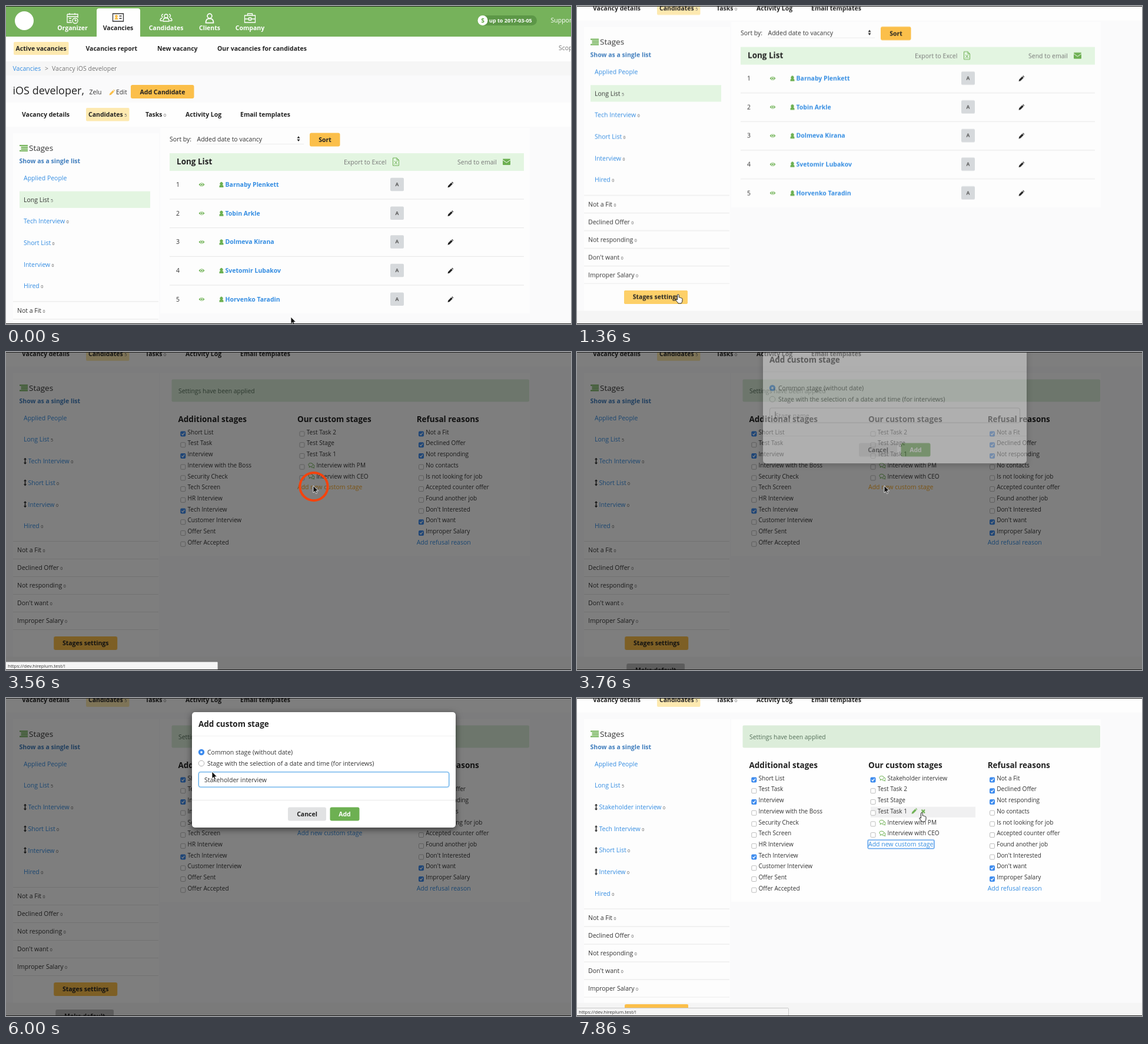
These frames come from a looping animation (960x540 px, 8000 ms). An HTML page:

```html
<!DOCTYPE html>
<html lang="en">
<head>
<meta charset="utf-8">
<title>Recruiting stages</title>
<style>
html, body { margin: 0; width: 100%; height: 100%; overflow: hidden; background: #fafafb; }
svg { display: block; width: 960px; height: 540px; }
text { font: 10.5px "Open Sans", "Noto Sans", sans-serif; fill: #333; white-space: pre; }
.b { font-weight: 700; fill: #222; }
.h { font-size: 13.5px; }
.big { font-size: 18px; fill: #222; }
.s { font-size: 10.05px; }
.m { text-anchor: middle; }
.l { fill: #348de2; }
.w { fill: #fff; }
.g { fill: #767676; }
.o { fill: #f5a623; }
.n { font-size: 7px; font-weight: 400; fill: #555; }

.scroll, .wide, .grow, .indent, .stretch, .dim, .dialog, .focus, .cursor { animation: 8s infinite; }
.scroll { animation-name: scroll; }
.wide { animation-name: wide; animation-timing-function: step-end; }
.grow { animation-name: grow; animation-timing-function: step-end; }
.indent { animation-name: indent; animation-timing-function: step-end; }
.stretch { animation-name: stretch; animation-timing-function: step-end; }
.dim { animation-name: dim; animation-timing-function: linear; }
.dialog { animation-name: dialog; animation-timing-function: ease-out; }
.focus { animation-name: focus; animation-timing-function: linear; }
.cursor { animation-name: cursor; animation-timing-function: ease-in-out; }
.ring { animation: ring 8s linear infinite; fill: none; stroke: #f4430d; stroke-width: 4; }

@keyframes scroll {
  0%, 6.1% { transform: none; animation-timing-function: ease-out; }
  9.125%, 100% { transform: translateY(-180.4px); }
}
@keyframes wide { 42.75%, 100% { transform: translateX(var(--dx)); } }
@keyframes grow { 93.5%, 100% { transform: translateY(var(--dy)); } }
@keyframes indent { 22.875%, 100% { transform: translateX(7.5px); } }
@keyframes stretch { 42.75%, 100% { x: 281.5px; width: 607.5px; } }
@keyframes dim {
  0%, 42.25% { opacity: 0; }
  44.25%, 92.5% { opacity: .5; }
  95%, 100% { opacity: 0; }
}
@keyframes dialog {
  0%, 46% { opacity: 0; transform: translateY(-50px); }
  50%, 92.5% { opacity: 1; transform: none; }
  94.5%, 100% { opacity: 0; transform: translateY(-50px); }
}
@keyframes focus {
  0%, 57.6% { opacity: 0; }
  59.6%, 80% { opacity: 1; }
  82%, 100% { opacity: 0; }
}
@keyframes ring {
  0% { r: 4.5px; opacity: 1; }
  3.25% { r: 27px; opacity: 1; }
  3.26%, 100% { r: 27px; opacity: 0; }
}
@keyframes cursor {
  0%, 11.25% { transform: translate(484px, 528px); }
  16.5%, 20.5% { transform: translate(172px, 490px); }
  30.75% { transform: translate(502px, 300px); }
  32.875%, 35.375% { transform: translate(501px, 270px); }
  40%, 47.5% { transform: translate(522px, 227px); }
  55.25%, 70.375% { transform: translate(489px, 136px); }
  75% { transform: translate(350px, 125px); }
  77.875%, 82% { transform: translate(331px, 110px); }
  87.875%, 93.75% { transform: translate(575px, 198px); }
  98%, 100% { transform: translate(586px, 195px); }
}
</style>
</head>
<body>
<svg id="stage" viewBox="0 0 960 540" xmlns="http://www.w3.org/2000/svg"></svg>
<script>
const LOOP = 8000, OPEN = 1830, ADDED = 7480;
const GREEN = '#6db052', AMBER = '#fbbf4a', MINT = '#e3f5e1', CREAM = '#fde9b0';

const text = (x, y, s, cls = '') => `<text x="${x}" y="${y}" class="${cls}">${s}</text>`;
const count = v => `<tspan dx="2.5" class="n">${v}</tspan>`;
const box = (x, y, w, h, fill, r = 0, more = '') =>
  `<rect x="${x}" y="${y}" width="${w}" height="${h}" rx="${r}" fill="${fill}" ${more}/>`;
const rule = (x1, x2, y, c = '#e6e6e6') => box(x1, y, x2 - x1, 1, c);
const path = (d, fill, more = '') => `<path d="${d}" fill="${fill}" ${more}/>`;
const at = (x, y, s) => `<g transform="translate(${x} ${y})">${s}</g>`;
// Shows its content only during the given spans of the loop, in ms.
const on = (spans, s) => `<g data-on="${spans}">${s}</g>`;
const wide = (dx, s) => `<g class="wide" style="--dx:${dx}px">${s}</g>`;
const grow = (dy, s) => `<g class="grow" style="--dy:${dy}px">${s}</g>`;
const each = (list, f) => list.map(f).join('');

const pencil = c => path('M-4.5 4.5L-3.7 1.4 1.5-3.8 3.8-1.5-1.4 3.7ZM2.2-4.5L3.2-5.2 5.2-3.2 4.5-2.2Z', c);
const person = path('M-3.5 4.5V2.5Q-3.5.5-1.5.2A2.6 2.6 0 1 1 1.5.2Q3.5.5 3.5 2.5V4.5Z', GREEN);
const eye = path('M-5 0Q0-6 5 0 0 6-5 0Z', GREEN) +
  '<circle r="2.4" fill="#fff"/><circle r="1.4" fill="' + GREEN + '"/>';
const chat = path('M-5-1a3.8 2.8 0 1 1 4 2.6L-4 3.2-3.2 1.2Q-5 .4-5-1ZM3.2-1.6Q5.2-.6 5 1 5 2 4 2.8L4.8 4.4 2.4 3.6Q.4 3.8-.6 2.8',
  'none', `stroke="${GREEN}" stroke-width="1"`);
const upDown = path('M0-5.5L2.6-2.6H.7V2.6H2.6L0 5.5-2.6 2.6H-.7V-2.6H-2.6Z', '#222');

const check = (x, y, ticked) => ticked
  ? box(x - 4.5, y - 4.5, 9, 9, '#3d8bee', 2) +
    path(`M${x - 2.3} ${y}l1.8 2 3-4.2`, 'none', 'stroke="#fff" stroke-width="1.3"')
  : box(x - 4, y - 4, 8, 8, '#fff', 1.5, 'stroke="#aaa" stroke-width=".8"');

const radio = (y, ticked) => ticked
  ? `<circle cx="332" cy="${y}" r="5.2" fill="#3d8bee"/><circle cx="332" cy="${y}" r="1.8" fill="#fff"/>`
  : `<circle cx="332" cy="${y}" r="4.8" fill="#fff" stroke="#aaa" stroke-width=".9"/>`;

function header() {
  const head = 'M-3 0a3 3 0 1 1 6 0a3 3 0 1 1-6 0';
  const bust = head + 'M-5 9Q-5 4-1.5 3.5H1.5Q5 4 5 9Z';
  const line = (d, c = '#fff') => path(d, 'none', `stroke="${c}" stroke-width="1.3"`);
  return box(0, 0, 960, 52, '#76b25b') + box(0, 52, 960, 42, '#fefefe') + box(0, 94, 960, 24, '#f6f6f6') +
    '<circle cx="31" cy="25" r="16" fill="#fff"/>' +
    path('M154 52V8q0-4 4-4h66q4 0 4 4v44z', '#fefefe') +
    at(113, 20, line('M-9-6H9V0M-9-6V8H-1M-9-2H9M-5-8V-5M4-8V-5M-6 1H-2M-6 5H-2M0 5a4.5 4.5 0 1 1 9 0a4.5 4.5 0 1 1-9 0M4.5 2V5H7')) +
    at(190.5, 19, line('M-9-6H9V7H-9ZM2-2H6M2 2H6', '#333') +
      path('M-6 4Q-6 1-3.5.8A2.4 2.4 0 1 1-2.5.8Q0 1 0 4Z', AMBER)) +
    at(272, 17, line(bust) + at(-7, 1, line('M2-4a2.5 2.5 0 1 0 0 5M-3 7Q-3 3 0 2.5M-3 7H1')) +
      at(7, 1, line('M-2-4a2.5 2.5 0 1 1 0 5M3 7Q3 3 0 2.5M3 7H-1'))) +
    at(346, 17, `<g transform="scale(1.3)">${line(bust)}</g>`) +
    at(414.5, 20, line('M-9-4H9V8H-9ZM-4-4V-7H4V-4M-9 2H-2M2 2H9M-2 0H2V4H-2Z')) +
    each([[113, 'Organizer'], [272, 'Candidates'], [346, 'Clients'], [414.5, 'Company']],
      ([x, s]) => text(x, 41, s, 'b m w')) +
    text(190.5, 41, 'Vacancies', 'b m') +
    box(804, 16, 98, 17, '#5c9747', 8.5) + '<circle cx="810" cy="24.5" r="8.5" fill="#fff"/>' +
    `<text x="810" y="28" class="b m" style="fill:${GREEN};font-size:10px">$</text>` +
    '<text x="821" y="27.7" class="b w" style="font-size:9px">up to 2017-03-05</text>' +
    text(925.5, 27.7, 'Support', 'w') + text(939, 75, 'Scope', 'g') +
    box(13, 61, 93.5, 22, CREAM, 2) +
    each([[16.5, 'Active vacancies'], [135.5, 'Vacancies report'], [257, 'New vacancy'],
      [359, 'Our vacancies for candidates']], ([x, s]) => text(x, 76, s, 'b')) +
    text(11.5, 110, 'Vacancies', 'l') + text(66, 110, '&gt;', 'g') + text(78, 110, 'Vacancy iOS developer', 'g') +
    text(11.5, 150, 'iOS developer,', 'big') + text(141.5, 150, 'Zelu') + at(180, 147, pencil(AMBER)) +
    text(187, 150, 'Edit') + box(212, 134, 107.5, 23, AMBER, 3) + text(266, 149.5, 'Add Candidate', 'b m') +
    box(0, 164, 960, 41, '#fefefe') + box(136, 173, 73.5, 22.5, CREAM, 2) +
    each([[27, 'Vacancy details'], [140, 'Candidates' + count(5)], [237, 'Tasks' + count(0)],
      [305, 'Activity Log'], [398, 'Email templates']], ([x, s]) => text(x, 187.7, s, 'b'));
}

function candidates() {
  const names = ['Barnaby Plenkett', 'Tobin Arkle', 'Dolmeva Kirana', 'Svetomir Lubakov', 'Horvenko Taradin'];
  return text(278, 230, 'Sort by:') + text(324.5, 230, 'Added date to vacancy') + rule(324, 506, 234, '#ececec') +
    path('M494.5 224.5L497 221 499.5 224.5ZM494.5 226.5L497 230 499.5 226.5Z', '#222') +
    box(516, 215.5, 51.5, 23, AMBER, 3) + text(542, 231, 'Sort', 'b m') +
    box(278, 250, 602, 30, MINT) + text(290, 269, 'Long List', 'b h') +
    text(574, 268.7, 'Export to Excel', 'g') + text(767, 268.7, 'Send to email', 'g') +
    path('M657.5 258H664L667.5 261.5V271H657.5ZM664 258V261.5H667.5M660 263L665 269M665 263L660 269', 'none',
      `stroke="${GREEN}"`) +
    box(844, 259.5, 13, 10.5, GREEN, 1) + path('M844 261.5L850.5 266 857 261.5', 'none', 'stroke="#fff"') +
    each(names, (name, i) => at(0, 303.3 + 48.67 * i,
      text(289, 3.7, i + 1) + at(332.5, 0, eye) + at(366, .3, person) + text(372.5, 3.7, name, 'b l') +
      box(653, -11.5, 23, 22.5, '#d6d9dc', 2) +
      '<text x="664.5" y="2.8" class="b m" style="font-size:8.5px;fill:#555">A</text>' +
      at(755, .5, pencil('#222')) + (i < 4 ? rule(278, 880, 24.2) : '')));
}

function sidebar() {
  const stage = (s, y) =>
    on(`${OPEN}-${LOOP}`, at(32.5, y - 3.8, upDown)) + `<g class="indent">${text(30, y, s + count(0), 'l')}</g>`;
  const lines = each([[23, 14], [25.5, 11.5], [25.5, 11.5], [23, 14]], ([x, w], i) => box(x, 55.5 + 3 * i, w, 2, GREEN));
  const refusals = ['Not a Fit', 'Declined Offer', 'Not responding', "Don't want", 'Improper Salary'];
  return lines + text(39, 65.5, 'Stages', 'h') + `<text x="22.5" y="86.5" class="b" style="fill:#3f7dbd">Show as a single list</text>` +
    text(30, 115.7, 'Applied People', 'l') +
    on(`0-${OPEN}`, box(23, 134, 222, 28.5, MINT) + text(30, 152.3, 'Long List' + count(5))) +
    on(`${OPEN}-${LOOP}`, text(30, 152.3, 'Long List' + count(5), 'l')) +
    on(`${ADDED}-${LOOP}`, stage('Stakeholder interview', 189)) +
    grow(36.6, stage('Tech Interview', 189) + stage('Short List', 225.7) + stage('Interview', 262.5) +
      text(30, 299, 'Hired' + count(0), 'l') + rule(12, 259, 321) +
      each(refusals, (s, i) => text(19, 340.3 + 30 * i, s + count(0)) + rule(12, 259, 351 + 30 * i)) +
      wide(1.2, box(80, 483, 108, 23, AMBER, 3) + on('1290-1900', box(80, 483, 108, 23, '#fdd069', 3)) +
        text(134, 498, 'Stages settings', 'b m') +
        on(`${OPEN}-${LOOP}`, box(83, 529, 99, 24, '#bababa', 3) + text(132.5, 543.7, 'Make default', 'b m'))));
}

function settings() {
  const extra = ['*Short List', 'Test Task', '*Interview', 'Interview with the Boss', 'Security Check', 'Tech Screen',
    'HR Interview', '*Tech Interview', 'Customer Interview', 'Offer Sent', 'Offer Accepted'];
  const custom = ['Test Task 2', 'Test Stage', 'Test Task 1', '@Interview with PM', '@Interview with CEO'];
  const refusal = ['*Not a Fit', '*Declined Offer', '*Not responding', 'No contacts', 'Is not looking for job',
    'Accepted counter offer', 'Found another job', "Don't Interested", "*Don't want", '*Improper Salary'];
  // A leading * marks a ticked box, @ an interview stage.
  const item = (x, s, i) => {
    const y = 139 + 18.72 * i, talk = s.includes('@');
    return check(x, y, s.includes('*')) + (talk ? at(x + 16, y - 2.5, chat) : '') +
      text(x + (talk ? 24.5 : 7.7), y + .7, s.replace(/[*@]/g, ''), 's');
  };
  const link = 'Add new custom stage';
  return box(262, 36, 628, 310, '#fefefe') + box(278, 46.5, 601, 38, '#dcedda', 2, 'class="stretch"') +
    wide(3, `<text x="290" y="69.5" style="font-size:10.35px;fill:#55705a">Settings have been applied</text>` +
      text(289.5, 119, 'Additional stages', 'b h') + each(extra, (s, i) => item(297.8, s, i))) +
    wide(5, text(490, 119, 'Our custom stages', 'b h') +
      on(`${ADDED}-${LOOP}`, item(498, '*@Stakeholder interview', 0)) +
      grow(18.72, on(`7700-${LOOP}`, box(494, 166, 178, 18, '#f0f0f1') + at(568, 173.5, pencil(GREEN)) +
          path('M580.5 171l5.5 5.5M586 171l-5.5 5.5', 'none', `stroke="${GREEN}" stroke-width="2.2"`)) +
        each(custom, (s, i) => item(498, s, i)) +
        on(`${ADDED}-${LOOP}`, box(489.3, 222.3, 112.5, 14.5, 'none', 1.5, 'stroke="#6aa9ee" stroke-width="1.8"')) +
        on(`0-3050 3800-${LOOP}`, text(490, 233.3, link, 'l')) + on('3050-3800', text(490, 233.3, link, 'o')))) +
    wide(7.2, text(690.5, 119, 'Refusal reasons', 'b h') + each(refusal, (s, i) => item(698.3, s, i)) +
      text(690.5, 327, 'Add refusal reason', 'l'));
}

function dialog() {
  return `<g class="dialog">` +
    box(316, 24, 448, 196, '#fff', 5, 'style="filter:drop-shadow(0 3px 6px rgba(0,0,0,.55))"') +
    text(327, 49, 'Add custom stage', 'b h') + rule(316, 764, 64, '#f1f1f1') + rule(316, 764, 173, '#e8e8e8') +
    on('0-6400', radio(92, true) + radio(111, false)) + on(`6400-${LOOP}`, radio(92, false) + radio(111, true)) +
    text(342, 95.5, 'Common stage (without date)') +
    text(342, 114.7, 'Stage with the selection of a date and time (for interviews)') +
    box(327.5, 126, 425, 25, '#fff', 3, 'stroke="#c4c4c4"') +
    `<g class="focus">${box(327.5, 126, 425, 25, 'none', 3, 'stroke="#b9dcf7" stroke-width="3"') +
      box(327.5, 126, 425, 25, '#fff', 3, 'stroke="#66afe9"')}</g>` +
    on('0-5460', `<text x="337" y="142.7" style="fill:#999">Stage name</text>` + box(336.5, 132, 1, 14, '#333')) +
    on(`5460-${LOOP}`, text(337, 142.7, 'Stakeholder interview')) +
    box(479, 185.5, 65, 23, '#e1e2e3', 3) + text(511.5, 201, 'Cancel', 'b m') +
    box(550.5, 185.5, 50, 23, GREEN, 3) + text(575.5, 201, 'Add', 'b m w') + '</g>';
}

function pointer() {
  const rings = each([1535, 3340, 4530, 6400, 7360], t =>
    `<circle class="ring" cx="1" cy="1.5" style="animation-delay:${t - LOOP}ms"/>`);
  const arrow = path('M0 0V12L2.8 9.5 4.6 13.6 6.5 12.8 4.8 8.8H8.5Z', '#111', 'stroke="#fff" stroke-width=".8"');
  const hand = path('M-1.6 9V1.2a1.4 1.4 0 0 1 2.8 0V5q1.4-.8 2 .5 1.4-.7 2 .6 1.8-.3 1.8 1.4V10q0 3-2 5H0Q-1 13-4 10q-.6-1.5.9-1.6z',
    '#fff', 'stroke="#222" stroke-width="1"');
  const beam = path('M-2.5-6.5Q0-6.5 0-5V5Q0 6.5-2.5 6.5M2.5-6.5Q0-6.5 0-5M0 5Q0 6.5 2.5 6.5', 'none', 'stroke="#111"');
  return `<g class="cursor">${rings +
    on('0-1290 1900-3050 3420-4350 5950-6980 7440-7780', arrow) +
    on(`1290-1900 3050-3420 6980-7440 7780-${LOOP}`, hand) + on('4350-5950', beam)}</g>`;
}

const status = box(-.5, 526.5, 360, 14, '#f5f5f5', 1, 'stroke="#c8c8c8"') +
  '<text x="3" y="536" style="font-size:8px">https://dev.hireplum.test/!</text>';

document.getElementById('stage').innerHTML =
  `<g class="scroll">${box(0, 0, 960, 760, '#fafafb') + box(12, 216, 248, 482, '#fdfdfd') +
    box(0, 698, 960, 62, '#f5f5f5') + header() +
    on(`0-${OPEN}`, box(262, 207, 628, 315, '#fdfdfd') + candidates()) +
    at(0, 180.4, sidebar() + on(`${OPEN}-${LOOP}`, settings()))}</g>` +
  box(0, 0, 960, 540, '#000', 0, 'class="dim"') + dialog() +
  on(`3050-3700 7780-${LOOP}`, status) + pointer() +
  box(0, 0, 960, 1, '#1c1c1c') + box(0, 539, 960, 1, '#1c1c1c');

for (const el of document.querySelectorAll('[data-on]')) {
  const frames = [];
  const add = (ms, opacity) => frames.push({ offset: ms / LOOP, opacity, easing: 'step-end' });
  const spans = el.dataset.on.split(' ').map(s => s.split('-').map(Number));
  if (spans[0][0] > 0) add(0, 0);
  for (const [from, to] of spans) { add(from, 1); add(to, 0); }
  if (spans.at(-1)[1] < LOOP) add(LOOP, 0);
  el.animate(frames, { duration: LOOP, iterations: Infinity });
}
</script>
</body>
</html>
```
